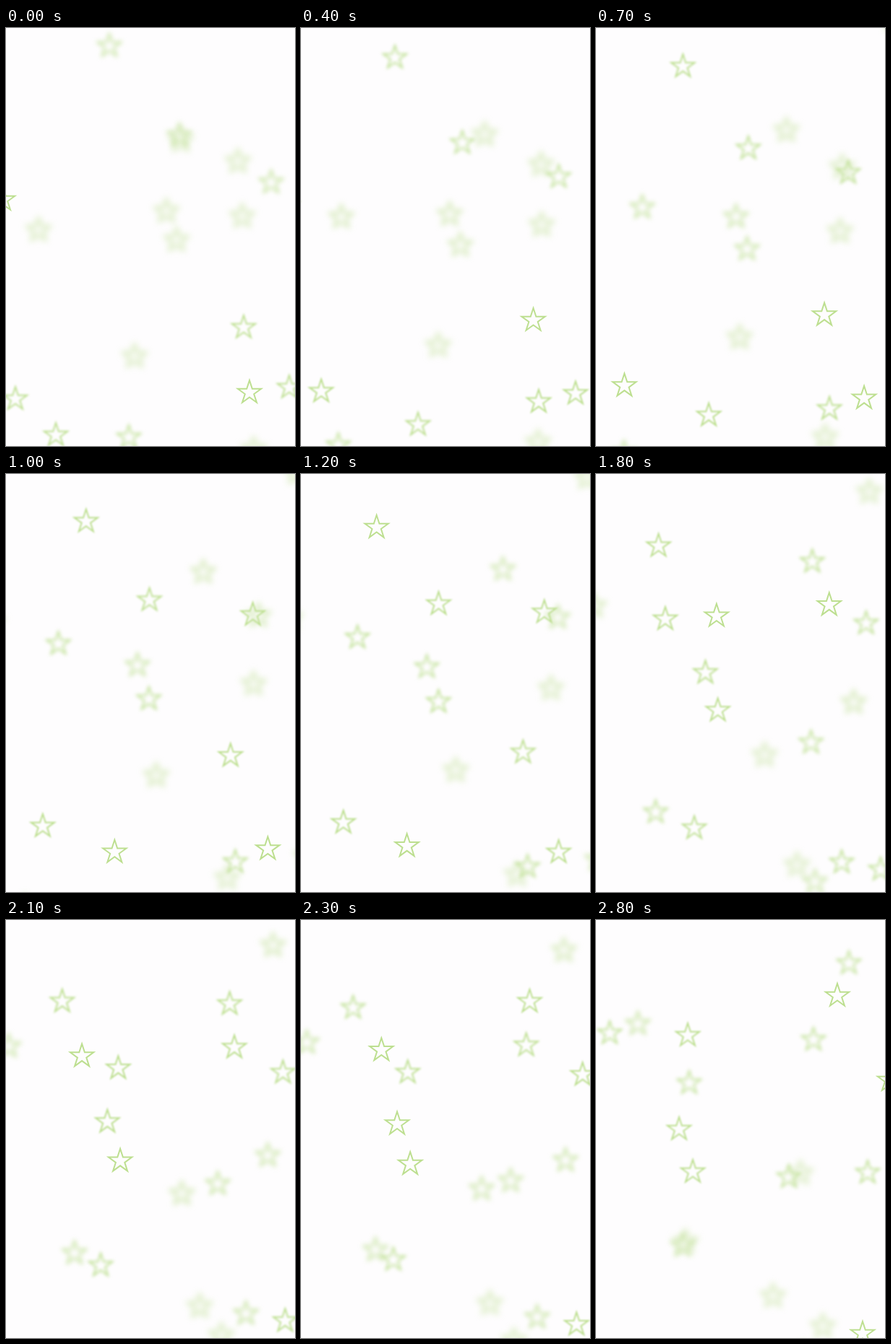
An HTML page with a canvas that plays this animation: 400 by 579 pixels, repeating every 2900 ms.

```html
<!DOCTYPE html>
<html>
<head>
<meta charset="utf-8">
<title>Drifting stars</title>
<style>
html, body { margin: 0; overflow: hidden; background: #fefdfe; }
canvas { display: block; }
</style>
</head>
<body>
<canvas width="400" height="579"></canvas>
<script>
const ctx = document.querySelector('canvas').getContext('2d');
const LOOP = 2900, STEP = 100, TRAVEL = 2.8;
const BLUR_RATE = 2.2, MIN_BLUR = 0.45, MAX_BLUR = 4.6, SWAY = 2;

// Each star drifts between two points and is sharp at one moment (s).
const star = (x0, y0, x1, y1, focus) => ({ x0, y0, x1, y1, focus });
const stars = [
  star(143, 25, 58, 144, 1.45),
  star(240, 149, 129, 226, 1.6),
  star(242, 156, 334, 105, 2.85),
  star(321, 185, 406, 222, 2.85),
  star(367, 214, 301, 166, 1.55),
  star(222, 254, 115, 290, 2.4),
  star(236, 294, 134, 349, 2.25),
  star(327, 261, 376, 350, 3.7),
  star(45, 280, 127, 160, 2.25),
  star(329, 415, 283, 351, 0.6),
  star(178, 455, 267, 356, 4),
  star(392, 498, 314, 563, 0.75),
  star(337, 505, 287, 601, 0.05),
  star(343, 584, 245, 521, 5),
  star(13, 514, 124, 446, 0.7),
  star(170, 567, 120, 451, 1.15),
  star(444, 508, 369, 573, 2.8),
  star(434, -33, 350, 60, 4.1),
  star(-37, 235, 19, 157, 3.7),
  star(69, 564, -46, 668, -0.8),
  star(-4, 238, -100, 300, -0.1)
];

const shape = new Path2D();
for (let i = 0; i < 10; i++) {
  const radius = i % 2 ? 6.5 : 17, angle = i * Math.PI / 5;
  shape.lineTo(radius * Math.sin(angle), -radius * Math.cos(angle));
}
shape.closePath();

function drawStar(t, { x0, y0, x1, y1, focus }) {
  const u = t / TRAVEL, sway = SWAY * Math.sin(u * Math.PI);
  const blur = Math.min(MAX_BLUR, Math.hypot(MIN_BLUR, BLUR_RATE * (t - focus)));
  ctx.setTransform(1, 0, 0, 1, x0 + (x1 - x0) * u - sway, y0 + (y1 - y0) * u - sway);
  ctx.filter = `blur(${blur.toFixed(2)}px)`;
  ctx.stroke(shape);
}

function render(now) {
  const t = Math.floor(now % LOOP / STEP) * STEP / 1000;
  ctx.resetTransform();
  ctx.filter = 'none';
  ctx.fillStyle = '#fefdfe';
  ctx.fillRect(0, 0, 400, 579);
  ctx.strokeStyle = '#bddf90';
  ctx.lineWidth = 2;
  for (const s of stars) drawStar(t, s);
}

let start;
function tick(now) {
  start ??= now;
  render(now - start);
  requestAnimationFrame(tick);
}
render(0);
requestAnimationFrame(tick);
</script>
</body>
</html>
```
